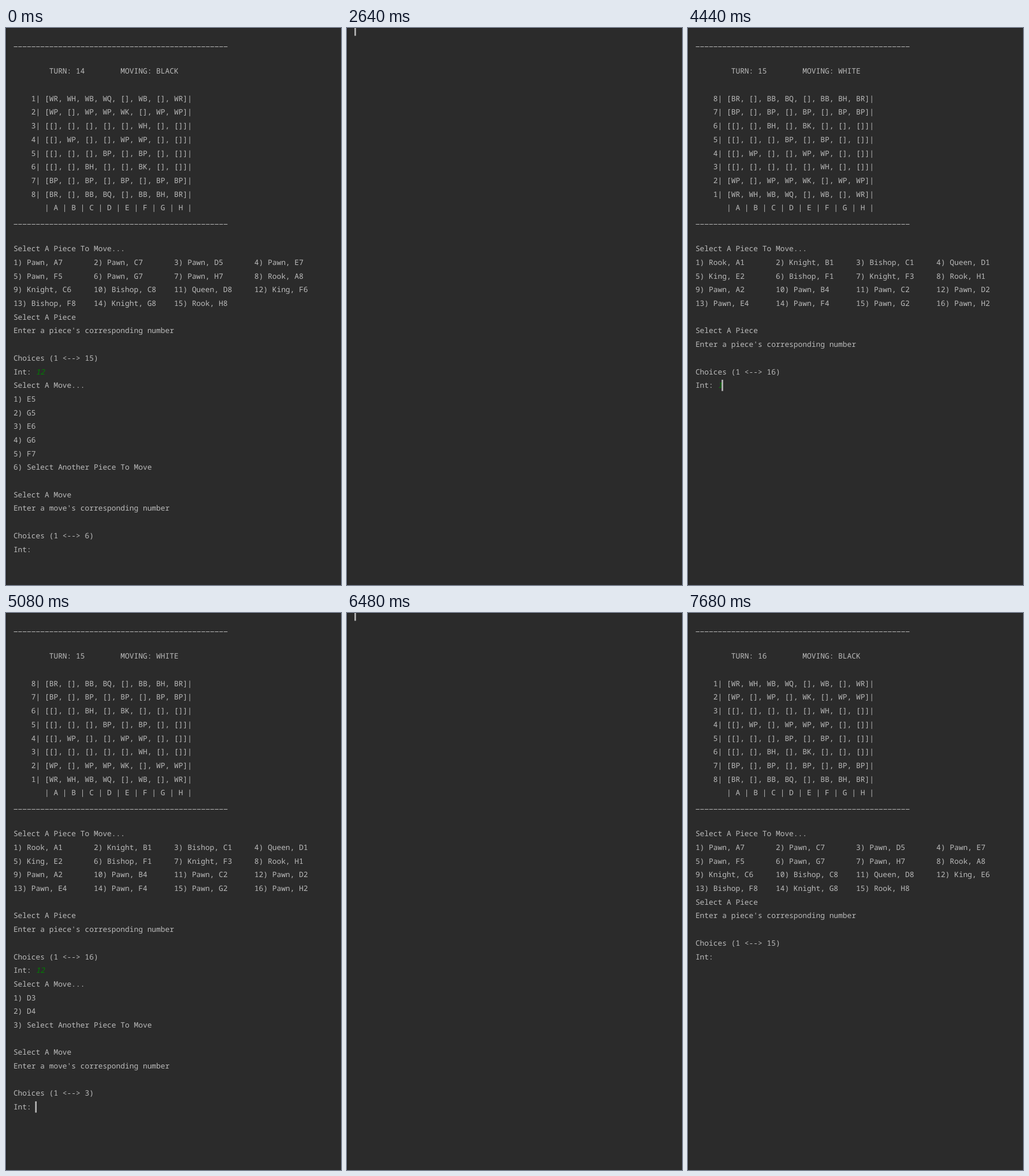
Recreate the animation shown at these times as an HTML page. Size 580x966 px, loop 8 s.

```html
<!DOCTYPE html>
<html lang="en">
<head>
<meta charset="utf-8">
<title>Console chess</title>
<style>
  html, body { margin: 0; width: 100%; height: 100%; overflow: hidden; background: #2b2b2b; }
  svg { display: block; width: 580px; height: 966px; }
  text {
    font: 500 12.89px "Noto Sans Mono", "DejaVu Sans Mono", monospace;
    font-variant-ligatures: none;
    text-rendering: geometricPrecision;
    white-space: pre;
    fill: #bbb;
  }
  .typed { fill: #007f00; font-style: italic; }
  .rule { stroke: #bbb; stroke-width: 1; stroke-dasharray: 6.4 1.335; }
</style>
</head>
<body>
<svg viewBox="0 0 580 966">
  <rect width="580" height="966" fill="#2b2b2b"/>
  <rect width="580" height="1" fill="#222"/>
  <rect width="1.5" height="966" fill="#222"/>
  <g id="lines"></g>
  <rect id="caret" width="2.6" fill="#bbb"/>
</svg>
<script>
const LOOP = 8000, LEFT = 12.9, CHAR = 7.735, ROW = 23.69, FIRST_BASELINE = 32;
const RULE = '---', PROMPT = 'Int: ';
const linesEl = document.getElementById('lines');
const caretEl = document.getElementById('caret');

const startRanks = [
  'WR WH WB WQ [] WB [] WR',
  'WP [] WP WP WK [] WP WP',
  '[] [] [] [] [] WH [] []',
  '[] WP [] [] WP WP [] []',
  '[] [] [] BP [] BP [] []',
  '[] [] BH [] [] BK [] []',
  'BP [] BP [] BP [] BP BP',
  'BR [] BB BQ [] BB BH BR'
].map(rank => rank.split(' '));

function move(ranks, from, to) {
  const next = ranks.map(rank => [...rank]);
  const at = square => [square[1] - 1, 'ABCDEFGH'.indexOf(square[0])];
  const [fromRank, fromFile] = at(from), [toRank, toFile] = at(to);
  next[toRank][toFile] = next[fromRank][fromFile];
  next[fromRank][fromFile] = '[]';
  return next;
}

function choices(count, noun) {
  return [`Select A ${noun}`, `Enter a ${noun.toLowerCase()}'s corresponding number`,
    '', `Choices (1 <--> ${count})`, PROMPT];
}

function turnScreen(turn, side, ranks, pieces) {
  const board = ranks.map((rank, i) => `    ${i + 1}| [${rank.join(', ')}]|`);
  if (side === 'WHITE') board.reverse();
  const items = pieces.split('/').map((piece, i) => `${i + 1}) ${piece.replace(' ', ', ')}`.padEnd(18));
  const list = [];
  for (let i = 0; i < items.length; i += 4) list.push(items.slice(i, i + 4).join(''));
  if (items.length % 4 === 0) list.push('');
  return [RULE, '', `        TURN: ${turn}        MOVING: ${side}`, '', ...board,
    '       | A | B | C | D | E | F | G | H |', RULE, '',
    'Select A Piece To Move...', ...list, ...choices(items.length, 'Piece')];
}

function moveMenu(squares) {
  const options = [...squares, 'Select Another Piece To Move'];
  return ['Select A Move...', ...options.map((option, i) => `${i + 1}) ${option}`),
    '', ...choices(options.length, 'Move')];
}

const type = (screen, input) => [...screen.slice(0, -1), PROMPT + input];

const blackPieces = king => 'Pawn A7/Pawn C7/Pawn D5/Pawn E7/Pawn F5/Pawn G7/Pawn H7/Rook A8/' +
  `Knight C6/Bishop C8/Queen D8/King ${king}/Bishop F8/Knight G8/Rook H8`;
const whitePieces = 'Rook A1/Knight B1/Bishop C1/Queen D1/King E2/Bishop F1/Knight F3/Rook H1/' +
  'Pawn A2/Pawn B4/Pawn C2/Pawn D2/Pawn E4/Pawn F4/Pawn G2/Pawn H2';

const afterKing = move(startRanks, 'F6', 'E6');
const afterPawn = move(afterKing, 'D2', 'D4');

const black = [...type(turnScreen(14, 'BLACK', startRanks, blackPieces('F6')), '12'),
  ...moveMenu(['E5', 'G5', 'E6', 'G6', 'F7'])];
const white = turnScreen(15, 'WHITE', afterKing, whitePieces);
const whiteChosen = type(white, '12');
const whiteMove = [...whiteChosen, ...moveMenu(['D3', 'D4'])];
const blackNext = turnScreen(16, 'BLACK', afterPawn, blackPieces('E6'));

// [start ms, console lines, caret visible]
const timeline = [
  [0, black, false],
  [600, black, true],
  [1200, black, false],
  [1600, type(black, '3'), true],
  [2640, [], true],
  [3040, white, true],
  [3640, white, false],
  [4240, white, true],
  [4440, type(white, '1'), true],
  [4680, whiteChosen, true],
  [4880, [...whiteChosen, ''], true],
  [5080, whiteMove, true],
  [5680, whiteMove, false],
  [6280, type(whiteMove, '2'), true],
  [6480, [], true],
  [6880, blackNext, true],
  [7680, blackNext, false]
];

const escapeText = text => text.replace(/</g, '&lt;').replace(/>/g, '&gt;');

function lineMarkup(line, i) {
  const y = FIRST_BASELINE + ROW * i;
  if (line === RULE) {
    return `<line class="rule" x1="${LEFT + 0.6}" x2="${LEFT + 48 * CHAR - 0.7}" y1="${y + 0.5}" y2="${y + 0.5}"/>`;
  }
  const content = line.startsWith(PROMPT)
    ? `${PROMPT}<tspan class="typed">${line.slice(PROMPT.length)}</tspan>`
    : escapeText(line);
  return `<text x="${LEFT}" y="${Math.round(y)}">${content}</text>`;
}

function show([, lines, caretOn]) {
  linesEl.innerHTML = lines.map(lineMarkup).join('');
  const empty = lines.length === 0;
  const column = empty ? 0 : lines[lines.length - 1].length;
  const top = empty ? 0 : FIRST_BASELINE + ROW * (lines.length - 1) - 14.2;
  caretEl.setAttribute('x', LEFT + CHAR * column - (column ? 1.1 : 0));
  caretEl.setAttribute('y', top);
  caretEl.setAttribute('height', empty ? 13.5 : 19.5);
  caretEl.setAttribute('visibility', caretOn ? 'visible' : 'hidden');
}

let current;
const origin = performance.now();

function tick() {
  const time = (performance.now() - origin) % LOOP;
  const state = timeline.filter(([start]) => start <= time).pop();
  if (state !== current) show(current = state);
  requestAnimationFrame(tick);
}
tick();
</script>
</body>
</html>
```
